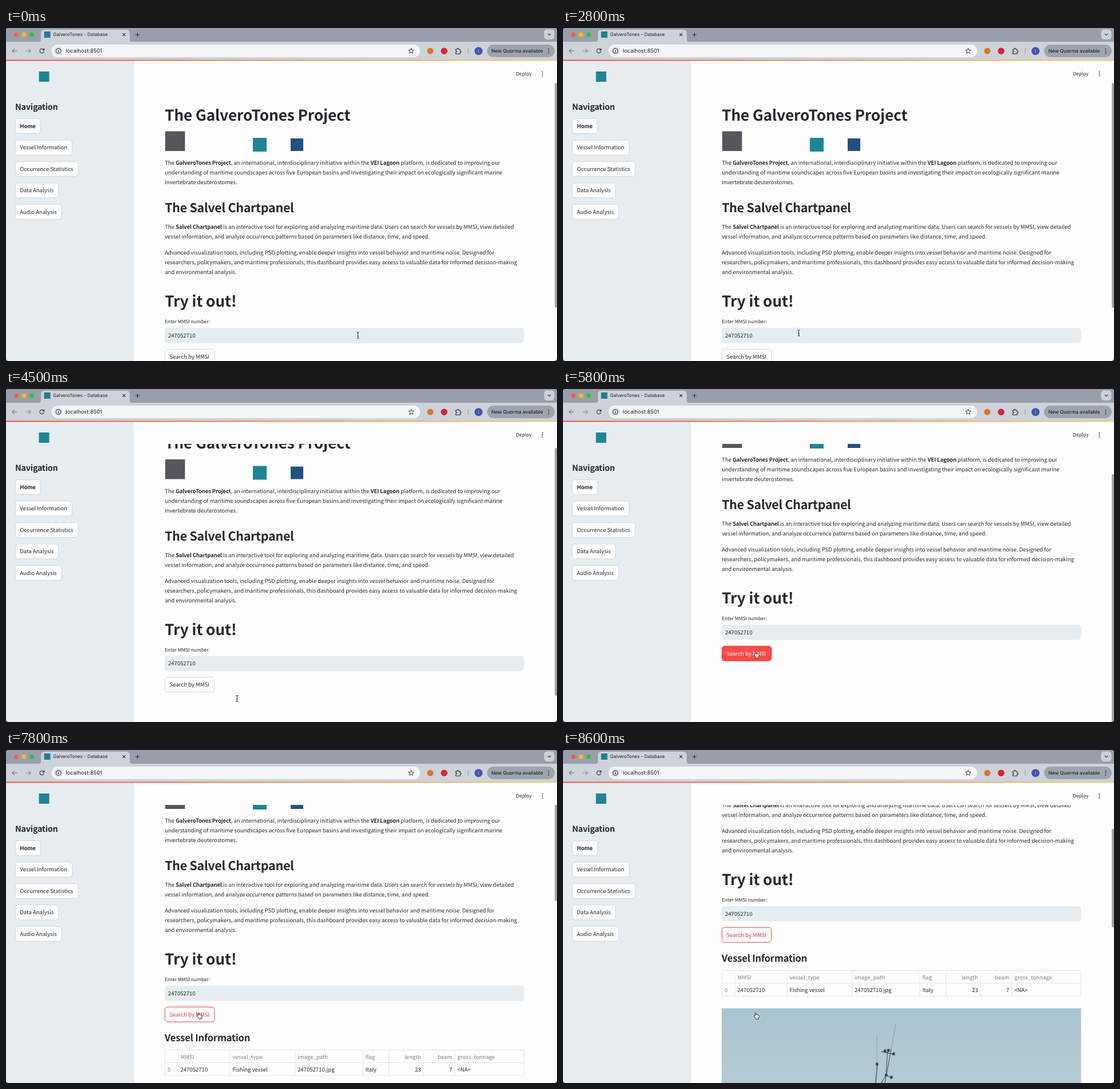
An HTML page for the animation above (8700 ms loop, 962 by 582 pixels).

```html
<!DOCTYPE html>
<html lang="en">
<head>
<meta charset="utf-8">
<title>Vessel search</title>
<style>
  html, body { margin: 0; width: 100%; height: 100%; overflow: hidden; background: #4a4d54; }
  svg { display: block; width: 100%; height: 100%; }
  text {
    font-family: "Noto Sans CJK JP", "Noto Sans CJK SC", "Noto Sans", sans-serif;
    font-size: 9.55px; fill: #262730; white-space: pre;
    font-kerning: normal; text-rendering: geometricPrecision;
  }
  .ui { font-family: Inter, Roboto, sans-serif; fill: #1f2126; }
  .b { font-weight: 700; letter-spacing: -.015em; }
  .h1 { font-size: 26.26px; font-weight: 700; letter-spacing: -.0055em; }
  .h2 { font-size: 21.5px; }
  .h3 { font-size: 16.7px; }
  .nav { font-size: 14.3px; }
  .small { font-size: 8.36px; }
  .dim { fill: #7c7e87; }
  .line { fill: none; stroke: #2b2d33; stroke-width: 1.1; stroke-linecap: round; stroke-linejoin: round; }
</style>
</head>
<body>
<svg id="stage" viewBox="0 0 962 582" preserveAspectRatio="none">
  <defs>
    <clipPath id="window"><rect width="962" height="582" rx="5"/></clipPath>
    <clipPath id="view"><rect x="224" y="96" width="733" height="486"/></clipPath>
    <linearGradient id="bar">
      <stop offset="0" stop-color="#f0504c"/><stop offset="1" stop-color="#ecd36a"/>
    </linearGradient>
    <linearGradient id="sky" x2="0" y2="1">
      <stop offset="0" stop-color="#a9c3ce"/><stop offset=".25" stop-color="#b4cad2"/>
      <stop offset="1" stop-color="#c3d3d7"/>
    </linearGradient>
    <path id="caret" d="M-2-5.5Q0-5.5 0-4Q0-5.5 2-5.5M0-4V4M-2 5.5Q0 5.5 0 4Q0 5.5 2 5.5M-1 1.5H1" fill="none"/>
  </defs>
  <g clip-path="url(#window)">
    <rect width="962" height="582" fill="#fdfdfd"/>
    <g clip-path="url(#view)"><g id="page"></g></g>
    <g id="side"></g>
    <g id="frame"></g>
    <rect id="thumb" x="958" width="4.5" rx="2" fill="#a3a4a7"/>
    <g id="beam">
      <use href="#caret" stroke="#fff" stroke-width="2.2" opacity=".7"/>
      <use href="#caret" stroke="#16171a" stroke-width="1"/>
    </g>
    <g id="hand">
      <path d="M-2.6-4.6q0-1.1.9-1.1t.9 1.1v2.7q.2-.8 1-.7t.8.9q.3-.6 1-.5t.8.9q.4-.4 1-.1t.5 1.2v2q0 1.6-1 2.5v1h-4.6v-1q-.9-.7-1.5-2l-1.4-2.2q-.3-.9.4-1.2t1.2.4Z"
        fill="#fff" stroke="#17181b" stroke-width=".9" stroke-linejoin="round"/>
      <path d="M-.2 1.7v1.6M1.2 1.7v1.6M2.5 1.7v1.6" stroke="#17181b" stroke-width=".5"/>
    </g>
  </g>
</svg>
<script>
const LOOP = 8700, STEP = 100, PRESS = 5700, RELEASE = 5900, HOVER = 5100, RESULT = 6700;
const $ = id => document.getElementById(id);

function add(parent, tag, attrs, body) {
  const el = document.createElementNS("http://www.w3.org/2000/svg", tag);
  for (const k in attrs) el.setAttribute(k, attrs[k]);
  if (body) el.innerHTML = body;
  parent.appendChild(el);
  return el;
}
const text = (g, x, y, s, cls = "", more = {}) => add(g, "text", { x, y, class: cls, ...more }, s);
const box = (g, x, y, width, height, fill, rx = 0, more = {}) =>
  add(g, "rect", { x, y, width, height, fill, rx, ...more });
const dot = (g, cx, cy, r, fill, more = {}) => add(g, "circle", { cx, cy, r, fill, ...more });
const path = (g, d, more = {}) => add(g, "path", { d, class: "line", ...more });
const bold = s => `<tspan class="b">${s}</tspan>`;
const dots = (g, x, y) => [-3.5, 0, 3.5].forEach(d => dot(g, x, y + d, 1, "#2b2d33"));

function button(g, x, y, w, label, cls) {
  return [
    box(g, x + .5, y + .5, w - 1, 26, "#fcfcfd", 5, { stroke: "#d2d6da" }),
    text(g, x + 8.6, y + 16.9, label, cls)
  ];
}

function buildFrame(g) {
  box(g, 0, 0, 962, 25, "#989faa");
  box(g, 0, 24, 962, 32, "#ced2d9");
  ["#fc5b54", "#f9b731", "#2fc142"].forEach((c, i) => dot(g, 18 + i * 13.4, 11.7, 4, c));
  add(g, "path", { d: "M56 24.5q5 0 5-5V9q0-6 6-6H210q6 0 6 6V19.5q0 5 5 5Z", fill: "#ced2d9" });
  box(g, 66.5, 6, 11, 11, "#1f7f91");
  text(g, 82.3, 14.4, "GalveroTones - Database", "ui", { style: "font-size:8px" });
  path(g, "M203.8 9.3l4.4 4.4m0-4.4l-4.4 4.4");
  path(g, "M229.5 8.5v6.4m-3.2-3.2h6.4");
  box(g, 939.5, 2.5, 18, 17.5, "#ccd1d8", 5);
  path(g, "M946.2 10.3l2.4 2.4 2.4-2.4");

  path(g, "M19 40h-8m3.3-3.3L11 40l3.3 3.3", { style: "stroke:#6d727b" });
  path(g, "M35 40h8m-3.3-3.3L43 40l-3.3 3.3", { style: "stroke:#858a93" });
  path(g, "M66 38.3a3.7 3.7 0 1 0 .2 2.8M66.5 36v2.7h-2.7");
  box(g, 79.5, 29, 643.5, 22, "#f3f5f8", 11);
  dot(g, 91.5, 40, 8, "#e2e6eb");
  dot(g, 91.5, 40, 4.3, "none", { class: "line" });
  path(g, "M91.5 39.8v2.2m0-4v.1");
  text(g, 104.5, 43.3, "localhost:8501", "ui", { style: "font-size:9.3px" });

  let star = "";
  for (let i = 0; i < 10; i++) {
    const r = i % 2 ? 2.2 : 4.9, a = i * Math.PI / 5;
    star += `${i ? "L" : "M"}${707.5 + r * Math.sin(a)} ${40.3 - r * Math.cos(a)}`;
  }
  path(g, star + "Z", { style: "stroke-width:.9" });
  dot(g, 740.8, 40.2, 5.5, "#d9752f");
  dot(g, 765, 40.2, 5.7, "#d7242f");
  path(g, "M785.2 37.3h2.5q-.2-2 1.3-2t1.3 2h2.5v2.7q2-.2 2 1.2t-2 1.3v2.7h-7.6v-2.7q1.8 0 1.8-1.3t-1.8-1.2Z");
  box(g, 806.5, 35, 1, 10, "#9399a2");
  dot(g, 825, 40.2, 7, "#4453b0");
  text(g, 825, 43, "i", "ui", { style: "font-size:8px;fill:#dfe3ff", "text-anchor": "middle" });
  box(g, 840, 29, 118, 22, "#9ea4ae", 11);
  text(g, 847.5, 43.2, "New Quorma available", "ui", { style: "font-size:8.4px;font-weight:500" });
  dots(g, 947.5, 40.2);

  box(g, 0, 55.5, 962, 2, "url(#bar)");
  text(g, 890.3, 83.2, "Deploy", "small");
  dots(g, 936.5, 80.2);
}

function buildSide(g) {
  box(g, 0, 57, 223.5, 525, "#e6ecef");
  box(g, 57.5, 76, 18, 18, "#1f8496");
  text(g, 16, 143.2, "Navigation", "nav b");
  [["Home", 45], ["Vessel Information", 100.5], ["Occurrence Statistics", 111],
   ["Data Analysis", 76.5], ["Audio Analysis", 82]].forEach(([label, w], i) =>
    button(g, 15.7, 158 + i * 37.45, w, label, i ? "" : "b"));
}

function buildTable(g) {
  const rule = { style: "stroke:#e1e4e8;stroke-width:1" };
  text(g, 277, 621, "Vessel Information", "h3 b");
  box(g, 277.5, 636.5, 627, 44.5, "none", 0, rule);
  path(g, "M277.5 658.5H904", rule);
  const cols = [[300, "MMSI", "247052710"], [391, "vessel_type", "Fishing vessel"],
    [504.5, "image_path", "247052710.jpg"], [623, "flag", "Italy"],
    [668.5, "length", "23", 729], [729, "beam", "7", 783.5], [783.5, "gross_tonnage", "&lt;NA&gt;"]];
  text(g, 282, 673.6, "0", "dim");
  for (const [x, head, cell, right] of cols) {
    path(g, `M${x} 636.5V681`, rule);
    const at = right ? right - 4.5 : x + 4.5, more = { "text-anchor": right ? "end" : "start" };
    text(g, at, 651.5, head, "dim", more);
    text(g, at, 673.6, cell, "", more);
  }
}

function buildPhoto(g) {
  box(g, 277, 702.5, 627.5, 420, "url(#sky)");
  const mast = (d, w, c = "#4d5a64") => path(g, d, { style: `stroke:${c};stroke-width:${w}` });
  mast("M581 731L573 774", .7, "#7d8c95");
  mast("M548 749V800M545 833L548 800", .7, "#8b9aa2");
  mast("M573 774L562 833M567 776L564 815", 1.2);
  mast("M556 778L578 783M549 801L546 833M556 833L564 819L575 824", 1.3);
  [[562, 777], [568, 776], [577, 782], [548, 800], [564, 819], [573, 823]].forEach(([x, y]) =>
    box(g, x - 2, y - 2.5, 4.5, 5, "#39444e", 1));
}

function buildPage(g) {
  const X = 277.2;
  text(g, X, 161.6, "The GalveroTones Project", "h1");
  box(g, 278, 180.5, 34.5, 34.5, "#56575c");
  box(g, 431, 192, 24, 24, "#1f8496");
  box(g, 497, 193, 22, 22, "#24507f");
  const lines = [
    [239.2, `The ${bold("GalveroTones Project")}, an international, interdisciplinary initiative within the ${bold("VEI Lagoon")} platform, is dedicated to improving our`],
    [256.2, "understanding of maritime soundscapes across five European basins and investigating their impact on ecologically significant marine"],
    [273.2, "invertebrate deuterostomes."],
    [351.3, `The ${bold("Salvel Chartpanel")} is an interactive tool for exploring and analyzing maritime data. Users can search for vessels by MMSI, view detailed`],
    [368.3, "vessel information, and analyze occurrence patterns based on parameters like distance, time, and speed."],
    [396, "Advanced visualization tools, including PSD plotting, enable deeper insights into vessel behavior and maritime noise. Designed for"],
    [413, "researchers, policymakers, and maritime professionals, this dashboard provides easy access to valuable data for informed decision-making"],
    [430, "and environmental analysis."]
  ];
  lines.forEach(([y, s]) => text(g, X, y, s));
  text(g, X, 322, "The Salvel Chartpanel", "h2 b");
  text(g, X, 487, "Try it out!", "h1");
  text(g, X, 516.3, "Enter MMSI number:", "small");
  box(g, 277, 524, 627.5, 26.5, "#e6ecef", 5);
  text(g, 283, 540.8, "247052710");
  const search = button(g, 277, 560.7, 87.5, "Search by MMSI");
  const result = add(g, "g", {});
  buildTable(result);
  buildPhoto(result);
  return { search, result };
}

// Each row: time, then values; linear in between.
function track(keys, t) {
  const i = keys.findIndex(k => k[0] > t);
  if (i < 0) return keys[keys.length - 1].slice(1);
  if (i === 0) return keys[0].slice(1);
  const a = keys[i - 1], b = keys[i], p = (t - a[0]) / (b[0] - a[0]);
  return a.slice(1).map((v, j) => v + (b[j + 1] - v) * p);
}

const SCROLL = [[0, 0], [4100, 0], [4500, 57.5], [4800, 96], [5100, 112],
  [7900, 112], [8200, 160], [8600, 251]];
const THUMB = [[0, 96, 393], [4100, 96, 393], [4500, 103, 433], [5100, 149, 433],
  [RESULT - 1, 149, 433], [RESULT, 96, 168], [7900, 96, 168], [8600, 138, 172]];
const MOUSE = [[0, 614.5, 537], [300, 612, 536], [1000, 550, 490], [1600, 490, 397],
  [1900, 480, 400], [2600, 420, 525], [3000, 403.5, 541], [4700, 403.5, 541], [5300, 338, 465]];

buildFrame($("frame"));
buildSide($("side"));
const { search: [face, label], result } = buildPage($("page"));

function draw(time) {
  const t = Math.floor(time % LOOP / STEP) * STEP;
  const [scroll] = track(SCROLL, t), [top, len] = track(THUMB, t), [x, y] = track(MOUSE, t);
  $("page").setAttribute("transform", `translate(0 ${-scroll})`);
  $("thumb").setAttribute("y", top);
  $("thumb").setAttribute("height", len);

  const pressed = t >= PRESS && t < RELEASE, hot = t >= HOVER;
  face.setAttribute("fill", pressed ? "#fb4a47" : "#fcfcfd");
  face.setAttribute("stroke", hot ? "#e9463f" : "#d2d6da");
  label.style.fill = pressed ? "#fff" : hot ? "#d93a33" : "";
  result.style.display = t >= RESULT ? "" : "none";

  for (const [id, on] of [["beam", !hot], ["hand", hot]]) {
    $(id).style.display = on ? "" : "none";
    $(id).setAttribute("transform", `translate(${x} ${y})`);
  }
}

const start = performance.now();
function tick() {
  draw(performance.now() - start);
  requestAnimationFrame(tick);
}
tick();
</script>
</body>
</html>
```
